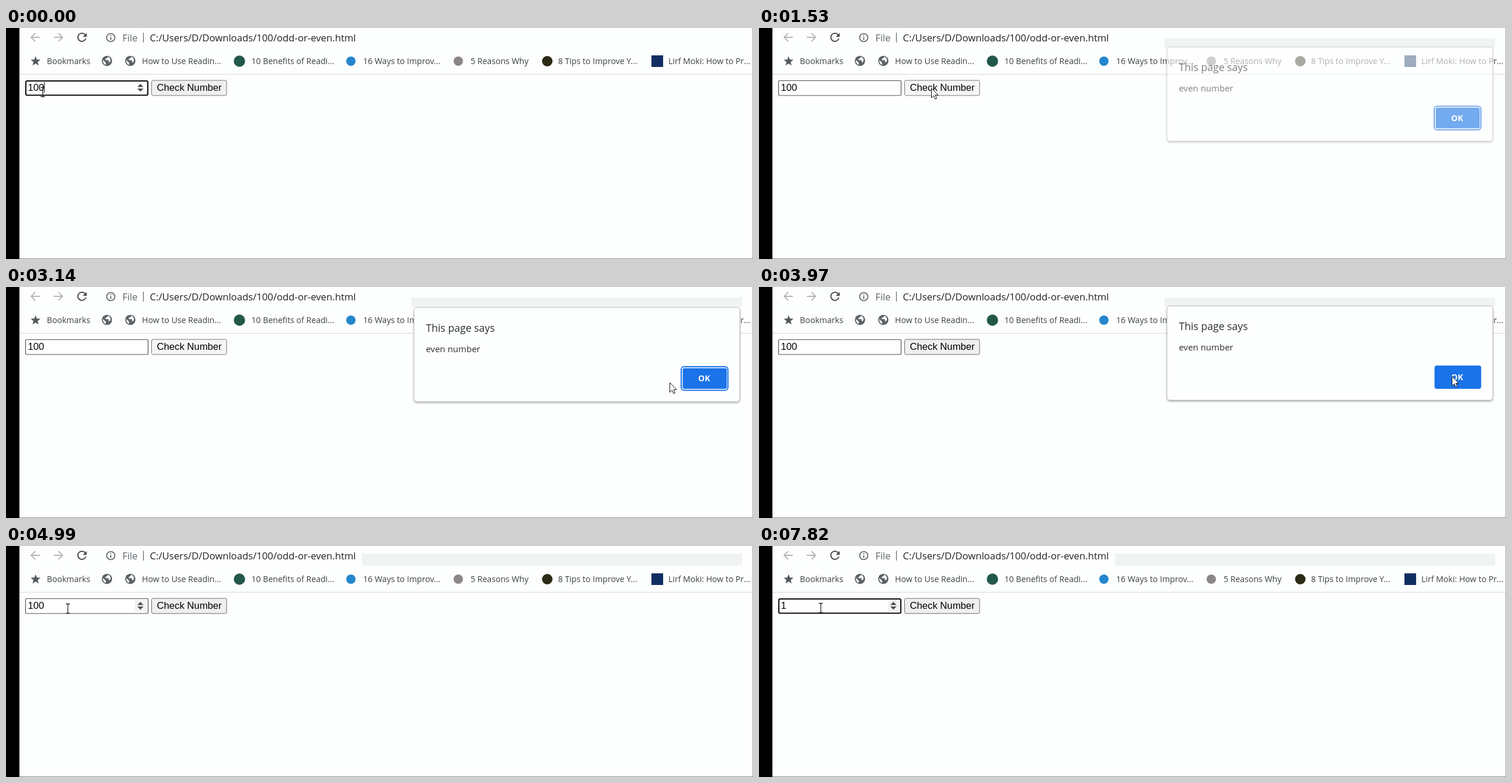
An HTML page for the animation above (8000 ms loop, 1280 by 397 pixels).

```html
<!DOCTYPE html>
<html lang="en">
<head>
<meta charset="utf-8">
<title>Odd or even</title>
<style>
  html, body { margin: 0; width: 100%; height: 100%; overflow: hidden; background: #fdfefe; }
  svg { display: block; }
  text { white-space: pre; }
  .ui { font-family: "Open Sans", "Noto Sans", sans-serif; }
  .form { font: 16.667px "Liberation Sans", Arial, sans-serif; fill: #000; }
  .mark { font-size: 14.100px; fill: #3c4043; }
  .line { fill: none; stroke-width: 1.8; }
</style>
</head>
<body>
<svg width="1280" height="397" viewBox="0 0 1280 397">
  <defs>
    <g id="globe">
      <circle r="8.800" fill="#5f6368"/>
      <path d="M-6.800-1.500L-2 3.200V6.800C-5.500 5.800-7.200 2.500-6.800-1.500ZM1-6.900C1.500-4.500-1-4-2.500-3.500V-1.200H2.800V2H5C7.500-1 6-6 1-6.900Z" fill="#fdfefe"/>
    </g>
    <filter id="shade" x="-5%" y="-10%" width="110%" height="125%">
      <feDropShadow dx="0" dy="2" stdDeviation="1.6" flood-color="#000" flood-opacity=".28"/>
    </filter>
  </defs>

  <rect width="1280" height="397" fill="#fdfefe"/>

  <!-- address bar -->
  <g class="line">
    <path d="M58 16H43.500M50 9L43 16L50 23" stroke="#b4b6b8"/>
    <path d="M82 16H96.500M90 9L97 16L90 23" stroke="#b4b6b8"/>
    <path d="M135.600 11.600A7 7 0 1 0 136.800 18" stroke="#4b4e52" stroke-width="2"/>
    <circle cx="179.500" cy="16.500" r="7" stroke="#5f6368" stroke-width="1.700"/>
    <path d="M179.500 15.500V20.500M179.500 12V13.800" stroke="#5f6368"/>
    <path d="M235.500 8V25" stroke="#6b6f73" stroke-width="1.300"/>
  </g>
  <path d="M138.300 8.500V15.300H131.500Z" fill="#4b4e52"/>
  <g class="ui">
    <text x="199.500" y="23" font-size="16.400" fill="#5f6368">File</text>
    <text x="246.500" y="23" font-size="16.700" fill="#202124">C:/Users/D/Downloads/100/odd-or-even.html</text>
  </g>

  <!-- bookmarks bar -->
  <path id="star" fill="#54585d"/>
  <use href="#globe" x="173" y="56.500"/>
  <use href="#globe" x="213" y="56.500"/>
  <circle cx="400" cy="57" r="9.700" fill="#22584a"/>
  <circle cx="591" cy="57" r="8" fill="#2486cc"/>
  <circle cx="775" cy="57" r="8" fill="#8b8586"/>
  <circle cx="927.500" cy="57" r="9" fill="#2c2a17"/>
  <rect x="1106" y="47" width="20" height="20" fill="#112e62"/>
  <g id="marks" class="ui mark"></g>
  <path d="M23 79.500H1280" stroke="#d6d8da"/>
  <rect id="strip" fill="#f1f3f3"/>

  <!-- form -->
  <rect id="field" fill="#fff"/>
  <g id="spinner">
    <rect id="spinnerBack" x="221" y="93" width="20" height="20" fill="#f2f2f2"/>
    <path d="M225 101.500L230.300 96L235.600 101.500ZM225 104L230.300 109.500L235.600 104Z" fill="#505050"/>
  </g>
  <text id="value" class="form" x="37.500" y="108"></text>
  <rect id="caret" y="93" width="1" height="18"/>
  <rect id="button" x="249.500" y="90" width="128.500" height="26" rx="2.500"/>
  <text class="form" x="258.500" y="108">Check Number</text>

  <path d="M0 0H23V397H0Z"/>
  <path d="M1279.500 0V397" stroke="#a8aaab"/>
  <path d="M23 396.500H1280" stroke="#8d8f90"/>

  <!-- dialog -->
  <g id="dialog">
    <rect x="699" y="35" width="558.500" height="162" rx="5" fill="#fdfefe" stroke="#b5b7b9" filter="url(#shade)"/>
    <g class="ui" fill="#2b2f33">
      <text x="719.500" y="76.500" font-size="17.600">This page says</text>
      <text x="719.500" y="111.500" font-size="15">even number</text>
    </g>
    <rect id="ring" x="1157" y="137" width="80" height="40.500" rx="5" fill="#fff" stroke="#1a73e8" stroke-width="2"/>
    <rect id="ok" fill="#1a73e8"/>
    <text class="ui" x="1186" y="162" font-size="14" font-weight="700" fill="#fff">OK</text>
  </g>

  <!-- pointers -->
  <path id="arrow" d="M.500.500V17L4.400 13.300L6.900 19.200L9.500 18.100L7 12.300H12Z" fill="#fff" stroke="#111"/>
  <path id="beam" d="M-3.500-8H-1Q0-8 0-7Q0-8 1-8H3.500M0-7V7M-3.500 8H-1Q0 8 0 7Q0 8 1 8H3.500" fill="none" stroke="#222" stroke-width="1.300"/>
</svg>
<script>
const LOOP = 8000;
const $ = id => document.getElementById(id);
const set = (id, attrs) => {
  for (const key in attrs) $(id).setAttribute(key, attrs[key]);
};
const show = (id, on) => set(id, { visibility: on ? "visible" : "hidden" });

// Each row starts with the time in ms from which it holds.
const pointer = [
  [0, "beam", 63, 110], [150, "beam", 117, 110], [270, "arrow", 177, 117],
  [420, "arrow", 242, 114], [570, "arrow", 287, 109], [710, "arrow", 287, 104],
  [850, "arrow", 295, 103], [2480, "arrow", 889, 177], [2630, "arrow", 898, 178],
  [2750, "arrow", 907, 179], [2900, "arrow", 972, 178], [3020, "arrow", 1070, 172],
  [3140, "arrow", 1137, 164], [3260, "arrow", 1170, 157], [3380, "arrow", 1185, 154],
  [3530, "arrow", 1187, 153], [4240, "arrow", 780, 125], [4370, "arrow", 317, 158],
  [4540, "arrow", 130, 121], [4840, "beam", 113, 114], [4990, "beam", 106, 107.5],
  [5390, "beam", 106, 106.5]
];
const caret = [
  [0, 65], [150, 0], [710, 65], [1260, 0], [5110, 65], [5670, 0],
  [6230, 65], [6520, 47], [6690, 39], [7260, 47], [7820, 0]
];
const value = [[0, "100"], [6520, "1"], [6690, ""], [7260, "1"]];
const focus = [[0, true], [1410, false], [5110, true]];
// visible, grey backing
const spinner = [[0, true, 0], [710, true, 1], [1410, false, 0], [4990, true, 1]];
const button = [
  [0, "#efefef", "#767676"], [570, "#e5e5e5", "#4f4f4f"],
  [1410, "#f5f5f5", "#767676"], [3970, "#efefef", "#6a6a6a"]
];
// opacity, vertical shift, focus ring
const dialog = [
  [0, 0, 0, true], [1530, .6, -2.5, true], [1650, 1, 0, true],
  [3970, 1, -2.5, false], [4090, 0, 0, false]
];
// left, top, width, height
const strip = [[0, 0, 0, 0, 0], [1530, 695, 18, 566, 16], [4090, 610, 13, 651.5, 21]];

const at = (rows, t) => rows.findLast(row => row[0] <= t).slice(1);

function buildBookmarks() {
  const labels = [
    [70, "Bookmarks"], [233, "How to Use Readin..."], [420.5, "10 Benefits of Readi..."],
    [612, "16 Ways to Improv..."], [796, "5 Reasons Why"],
    [946, "8 Tips to Improve Y..."], [1135, "Lirf Moki: How to Pr..."]
  ];
  for (const [x, label] of labels) {
    const text = document.createElementNS("http://www.w3.org/2000/svg", "text");
    text.setAttribute("x", x);
    text.setAttribute("y", 61.5);
    text.textContent = label;
    $("marks").append(text);
  }
  const points = Array.from({ length: 10 }, (_, i) => {
    const r = i % 2 ? 3.7 : 8.8, a = (i * 36 - 90) * Math.PI / 180;
    return [50.7 + r * Math.cos(a), 57.3 + r * Math.sin(a)].map(n => n.toFixed(2));
  });
  set("star", { d: "M" + points.join("L") + "Z" });
}

function draw(t) {
  const [kind, px, py] = at(pointer, t);
  for (const id of ["arrow", "beam"]) show(id, id === kind);
  set(kind, { transform: `translate(${px} ${py})` });

  const [focused] = at(focus, t);
  set("field", focused
    ? { x: 34, y: 91, width: 209, height: 24.5, rx: 2, stroke: "#080808", "stroke-width": 2 }
    : { x: 33.5, y: 90.5, width: 210, height: 25.5, rx: 1.5, stroke: "#505050", "stroke-width": 1.2 });
  const [spinnerOn, backing] = at(spinner, t);
  show("spinner", spinnerOn);
  set("spinnerBack", { opacity: backing });
  $("value").textContent = at(value, t)[0];
  const [caretX] = at(caret, t);
  show("caret", caretX);
  set("caret", { x: caretX });

  const [fill, stroke] = at(button, t);
  set("button", { fill, stroke });

  const [opacity, dy, ringed] = at(dialog, t);
  set("dialog", { opacity, transform: `translate(0 ${dy})` });
  set("ring", { opacity: ringed ? 1 : 0 });
  set("ok", ringed
    ? { x: 1159.5, y: 139.5, width: 75.5, height: 35.5, rx: 3 }
    : { x: 1157.5, y: 137.5, width: 80, height: 40, rx: 4 });

  const [x, y, width, height] = at(strip, t);
  set("strip", { x, y, width, height });
}

buildBookmarks();
const start = performance.now();
function tick() {
  draw((performance.now() - start) % LOOP);
  requestAnimationFrame(tick);
}
tick();
</script>
</body>
</html>
```
